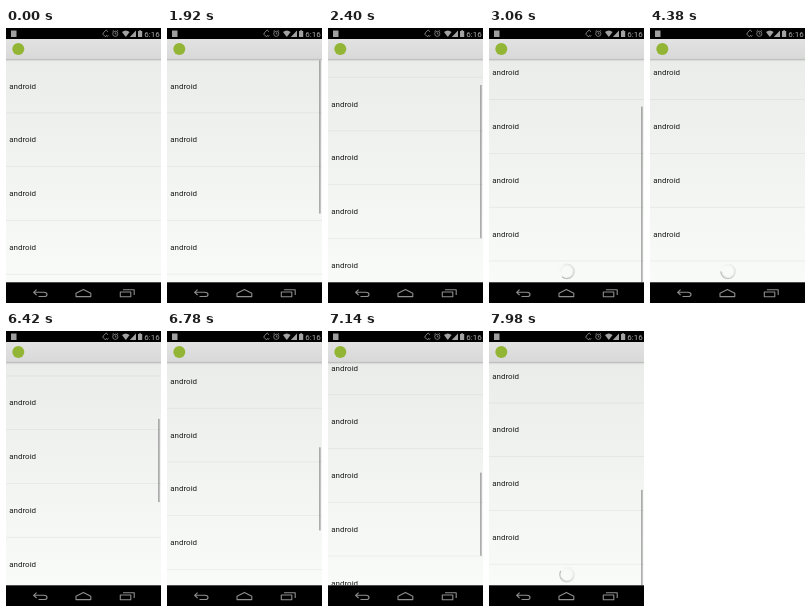
An HTML page with a canvas for the animation above (8 s loop, 155 by 275 pixels).

```html
<!DOCTYPE html>
<html lang="en">
<head>
<meta charset="utf-8">
<style>
html, body { margin: 0; width: 100%; height: 100%; overflow: hidden; background: #000; }
canvas { display: block; width: 155px; height: 275px; }
</style>
</head>
<body>
<canvas></canvas>
<script>
const W = 155, H = 275, LOOP = 8000;
const LIST_TOP = 31.3, LIST_BOTTOM = 254.3, LIST_H = LIST_BOTTOM - LIST_TOP;
const ROW = 53.75, FOOTER = 20.7;
const LOAD_AT = 5280;

const canvas = document.querySelector('canvas');
const ctx = canvas.getContext('2d');
const dpr = window.devicePixelRatio || 1;
canvas.width = W * dpr;
canvas.height = H * dpr;

// time, scroll offset
const SCROLL = [
  [0, 0], [1900, 0], [2400, 35.7], [2880, 67], [5250, 67], [5520, 98.9],
  [6060, 98.9], [6420, 147.3], [7140, 289.8], [7700, 335.5], [8000, 335.5]
];
// scrollbar visibility: shown from, fade start, fade end
const BAR = [[1920, 3180, 3430], [5280, 5760, 5990], [6060, 8000, 8250]];

const clamp = (v, a, b) => Math.min(b, Math.max(a, v));

// Monotone cubic through the keys
function scrollAt(t) {
  const k = SCROLL;
  const slope = i => (k[i + 1][1] - k[i][1]) / (k[i + 1][0] - k[i][0]);
  const tangent = i => {
    if (i === 0 || i === k.length - 1) return 0;
    const a = slope(i - 1), b = slope(i);
    return a * b <= 0 ? 0 : 2 * a * b / (a + b);
  };
  let i = 0;
  while (i < k.length - 2 && t >= k[i + 1][0]) i++;
  const h = k[i + 1][0] - k[i][0], u = (t - k[i][0]) / h, v = 1 - u;
  return k[i][1] * (1 + 2 * u) * v * v + tangent(i) * h * u * v * v +
    k[i + 1][1] * u * u * (3 - 2 * u) - tangent(i + 1) * h * u * u * v;
}

function barAlpha(t) {
  const bar = BAR.find(([from, , to]) => t >= from && t < to);
  return bar ? clamp((bar[2] - t) / (bar[2] - bar[1]), 0, 1) : 0;
}

function rect(x, y, w, h, fill) {
  ctx.fillStyle = fill;
  ctx.fillRect(x, y, w, h);
}

function vertical(y0, y1, ...colors) {
  const g = ctx.createLinearGradient(0, y0, 0, y1);
  colors.forEach((c, i) => g.addColorStop(i / (colors.length - 1), c));
  return g;
}

function shape(d, color, width) {
  const path = new Path2D(d);
  if (width) {
    ctx.strokeStyle = color;
    ctx.lineWidth = width;
    ctx.stroke(path);
  } else {
    ctx.fillStyle = color;
    ctx.fill(path);
  }
}

function text(str, x, y, size, color) {
  ctx.font = `${size}px Roboto, sans-serif`;
  ctx.fillStyle = color;
  ctx.fillText(str, x, y);
}

function arcRing(x, y, r, width, angle, strength) {
  const g = ctx.createConicGradient(angle, x, y);
  g.addColorStop(0, 'rgba(120,120,120,0)');
  g.addColorStop(0.25, 'rgba(120,120,120,0.05)');
  g.addColorStop(0.97, `rgba(120,120,120,${strength})`);
  g.addColorStop(1, 'rgba(120,120,120,0)');
  ctx.strokeStyle = g;
  ctx.lineWidth = width;
  ctx.beginPath();
  ctx.arc(x, y, r, 0, Math.PI * 2);
  ctx.stroke();
}

function spinner(x, y, t) {
  const turn = t / 3500 * Math.PI * 2;
  arcRing(x, y, 7.2, 1.2, turn * 3 - 1.5, 0.5);
  arcRing(x, y, 6, 0.8, -turn * 2, 0.2);
}

function drawList(t) {
  const scroll = scrollAt(t);
  const count = t < LOAD_AT ? 5 : 10;
  ctx.save();
  ctx.beginPath();
  ctx.rect(0, LIST_TOP, W, LIST_H);
  ctx.clip();
  for (let i = 0; i < count; i++) {
    const y = LIST_TOP + i * ROW - scroll;
    if (y > LIST_BOTTOM || y + ROW < LIST_TOP) continue;
    text('android', 3.2, y + 29.4, 8, '#1c1c1c');
    rect(0, y + ROW - 0.4, W, 0.6, 'rgba(0,0,0,0.08)');
  }
  const footer = LIST_TOP + count * ROW - scroll;
  if (footer < LIST_BOTTOM) spinner(78, footer + FOOTER / 2, t);
  drawBar(t, scroll, count);
  ctx.restore();
}

function drawBar(t, scroll, count) {
  const alpha = barAlpha(t);
  if (!alpha) return;
  const range = count + 1;
  const rowsLeft = count - scroll / ROW;
  const bottomSpace = Math.max(0, LIST_H - rowsLeft * ROW);
  const extent = Math.min(LIST_H / ROW, rowsLeft) + Math.min(1, bottomSpace / FOOTER);
  const length = LIST_H * extent / range;
  const top = Math.min(LIST_TOP + LIST_H * scroll / ROW / range, LIST_BOTTOM - length);
  rect(152, top + 1, 1.7, length - 1, `rgba(90,90,90,${0.48 * alpha})`);
}

function drawStatusBar() {
  const c = '#a2a2a2';
  rect(0, 0, W, 11, '#000');
  rect(5, 2.5, 5.5, 6.5, '#a0a0a0');
  shape('M97.6 4.5 L100.2 2 L102 3.8 M101.2 7 L99.4 8.8 L96.8 6.2 L97.6 4.5 M101 8.8 L102.3 7.4', c, 0.8);
  shape('M106.7 5.8 a2.6 2.6 0 1 0 5.2 0 a2.6 2.6 0 1 0 -5.2 0 M109.3 4.3 V6 H110.6 M106.4 3.3 L107.8 2.1 M112.2 3.3 L110.8 2.1', c, 0.7);
  shape('M116 4 Q119.8 1 123.6 4 L119.8 9 Z', c);
  shape('M130 2.4 V9 H123.8 Z', c);
  shape('M132 3 H133.2 V2.2 H135 V3 H136.2 V9 H132 Z', c);
  text('6:16', 138.3, 8.6, 8, '#b4b4b4');
}

function drawActionBar() {
  rect(0, 11, W, 20.3, vertical(11, 31.3, '#e2e2e2', '#dddddd', '#d8d8d8'));
  rect(0, 30.9, W, 0.9, '#bcbcbc');
  rect(0, 31.8, W, 2, vertical(31.8, 33.8, 'rgba(0,0,0,0.1)', 'rgba(0,0,0,0)'));
  ctx.fillStyle = '#93b535';
  ctx.beginPath();
  ctx.arc(12.3, 21, 6, 0, Math.PI * 2);
  ctx.fill();
}

function drawNavBar() {
  const c = '#8e8e8e';
  rect(0, LIST_BOTTOM, W, H - LIST_BOTTOM, '#000');
  shape('M30.6 261.6 L27.6 264.3 L30.6 267 M27.8 264.3 H37.8 Q41 264.3 41 266.4 Q41 268.5 38 268.5 H32.5', c, 1.1);
  shape('M70 265.2 L77.4 261.4 L84.8 265.2 V268.6 H70 Z', c, 1.1);
  shape('M114.3 264 H124.8 V268.8 H114.3 Z M117 261.7 H128.2 V267', c, 1.1);
}

function draw(t) {
  ctx.setTransform(dpr, 0, 0, dpr, 0, 0);
  ctx.lineJoin = 'round';
  rect(0, 0, W, H, vertical(11, LIST_BOTTOM, '#e9ebe9', '#f1f3f1', '#f9fbf9'));
  drawList(t);
  drawActionBar();
  drawStatusBar();
  drawNavBar();
}

const start = performance.now();
function frame() {
  draw((performance.now() - start) % LOOP);
  requestAnimationFrame(frame);
}
frame();
</script>
</body>
</html>
```
